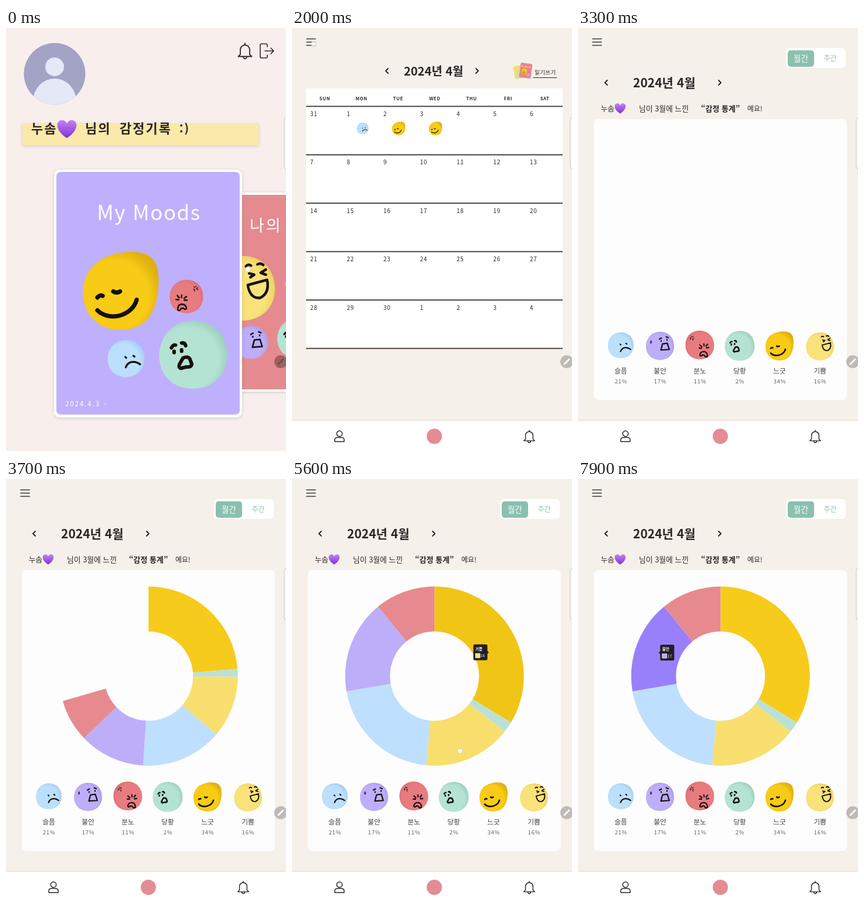
An HTML page for the animation above (8 s loop, 478 px wide and 720 px high).

```html
<!DOCTYPE html>
<html lang="ko">
<head>
<meta charset="utf-8">
<title>My Moods</title>
<style>
  html, body { margin: 0; width: 100%; height: 100%; overflow: hidden; background: #f7f0eb; }
  svg { display: block; width: 100vw; height: 100vh; }
  text { font-family: "Noto Sans CJK KR", "Noto Sans CJK", "Noto Sans CJK JP", "Noto Sans", sans-serif; }
</style>
</head>
<body>
<svg id="stage" viewBox="0 0 478 720"></svg>
<script>
const LOOP = 8000, STEP = 100;
const TITLE = 'My Moods', USER = '누솜';
const INK = '#2b2626';

// ---------- drawing helpers ----------
const text = (x, y, size, str, o = {}) =>
  `<text x="${x}" y="${y}" font-size="${size}" font-weight="${o.w || 400}" fill="${o.fill || INK}"
    text-anchor="${o.mid ? 'middle' : 'start'}" letter-spacing="${o.ls || 0}">${str}</text>`;
const rect = (x, y, w, h, r, fill, more = '') =>
  `<rect x="${x}" y="${y}" width="${w}" height="${h}" rx="${r}" fill="${fill}" ${more}/>`;
const line = (d, width = 1.8, color = INK) =>
  `<path d="${d}" fill="none" stroke="${color}" stroke-width="${width}" stroke-linecap="round" stroke-linejoin="round"/>`;
const at = (x, y, s, body) => `<g transform="translate(${x} ${y}) scale(${s})">${body}</g>`;
const group = (id, body) => `<g id="${id}">${body}</g>`;

// ---------- mood faces, drawn in a box of -50..50 ----------
const ROUND = 'M2,-50 C32,-49 51,-27 50,2 C50,30 28,50 0,50 C-30,50 -50,30 -50,1 C-49,-28 -30,-50 2,-50Z';
const CORNER = 'M8,-51 C38,-53 50,-42 50,-14 C50,26 34,52 -1,52 C-36,51 -50,26 -50,2 C-50,-28 -28,-48 8,-51Z';
const MOODS = {
  calm: { base: '#f7cb16', edge: '#dfb00f', shape: CORNER, pen: 5.6,
    lines: 'M-31,9 Q-27,5 -24,7 M-10,1 Q-5,4 -1,1 M-31,26 C-16,41 15,34 21,12' },
  sad: { base: '#bcdffc', edge: '#a3cdf0', shape: ROUND, pen: 5.2,
    lines: 'M-2,-4 l2,2 M20,-7 l3,2 M-1,24 C6,6 26,6 38,16' },
  shock: { base: '#b5e3d3', edge: '#98cdba', shape: ROUND, pen: 5.2,
    lines: 'M-32,-10 q3,-5 6,-4 M-17,-17 q5,-1 6,4 M-28,-5 v2 M-17,-7 v2 M-15,5 Q-8,2 -5,6 L-2,14 Q-3,19 -10,18 L-18,20 Q-22,19 -20,14Z' },
  angry: { base: '#e87b80', edge: '#dd7177', shape: ROUND, pen: 4.4,
    lines: 'M-27,-3 l5,7 M-31,9 l8,1 M-14,-4 l-1,7 M0,0 l-7,6 M2,11 l-8,0 M-26,40 Q-27,25 -15,23 Q-1,23 0,36 Q-4,41 -9,35 Q-16,33 -18,40 Q-22,43 -26,40Z',
    thin: 'M22,-29 l4,2 l3,-4 M34,-26 l-4,3 l4,3 M21,-22 l4,1 l-1,5' },
  worry: { base: '#bdaefa', edge: '#ad9def', shape: ROUND, pen: 4.6,
    lines: 'M-2,-24 l7,-4 M22,-32 l7,3 M4,-18 v2 M25,-22 v2 M3,15 L9,-7 L26,-9 L33,13Z',
    thin: 'M-32,-18 q-4,8 0,9 q4,-1 0,-9' },
  joy: { base: '#f9e27a', edge: '#ead05c', shape: ROUND, pen: 4,
    lines: 'M5,-34 q4,-4 8,-1 M23,-37 q5,-3 9,1 M10,-23 l8,2 l-6,4 M36,-29 l-8,5 l8,3 M8,-5 L38,-13 Q42,8 27,15 Q11,16 8,-5Z' }
};
const face = (name, x, y, s, flip = 1) => {
  const m = MOODS[name];
  return `<g transform="translate(${x} ${y}) scale(${s * flip} ${s})">
    <path d="${m.shape}" fill="url(#${name})"/>${line(m.lines, m.pen, '#15100c')}
    ${m.thin ? line(m.thin, 2.6, '#4a1f22') : ''}</g>`;
};

const heart = (x, y, s) =>
  at(x, y, s, '<path d="M0,15 C-22,1 -18,-15 -8,-15 C-4,-15 -1,-12 0,-9 C1,-12 4,-15 8,-15 C18,-15 22,1 0,15Z" fill="url(#heart)"/>');
const bell = (x, y, s) =>
  at(x, y, s, line('M-8,6 V-2 a8,8 0 0 1 16,0 V6 l3.5,3.5 H-11.5Z M0,-10.5 v-2.5 M-3,10 a3,3.4 0 0 0 6,0', 1.8));
const burger = line('M25,18.5 H40 M25,24 H40 M25,29.5 H40', 1.7, '#3c3838');
const arrows = (a, b, y) =>
  line(`M${a + 2},${y - 4} l-4,4 l4,4 M${b - 2},${y - 4} l4,4 l-4,4`, 2);
const pen = (fill, ink) =>
  at(469, 568, 1, `<circle r="11" fill="${fill}"/>` + line('M-4,4 L4,-4', 2.6, ink));

const nav = rect(0, 669, 478, 60, 0, '#fff', 'filter="url(#soft)"') +
  line('M76.3,690.5 a4.7,4.7 0 1 1 9.4,0 a4.7,4.7 0 1 1 -9.4,0 M73,704 V701 q0,-4 5,-4 h6 q5,0 5,4 V704Z', 1.5) +
  '<circle cx="243" cy="695" r="13" fill="#e48c95"/>' + bell(405, 695, .8);

// ---------- pages ----------
function home() {
  return rect(0, 0, 478, 720, 0, '#f8efec') +
    `<clipPath id="disc"><circle cx="83" cy="78" r="52.5"/></clipPath>
    <g clip-path="url(#disc)">${rect(30, 25, 106, 106, 0, '#a2a3c5')}
      <circle cx="83" cy="66" r="16" fill="#e4e8f7"/><ellipse cx="83" cy="125" rx="37" ry="39" fill="#e4e8f7"/></g>` +
    bell(408, 39, 1) +
    line('M446,32 V29 q0,-2 -2,-2 H436 q-2,0 -2,2 V49 q0,2 2,2 H444 q2,0 2,-2 V46 M442,39 H457 M452,34 l5,5 l-5,5', 1.6) +
    rect(28, 163, 403, 37, 0, '#fae9ab', 'filter="url(#soft)"') +
    text(43, 179, 22, USER, { w: 900, ls: 2 }) + heart(104, 172, 1.02) +
    text(135, 179, 22, '님의', { w: 900, ls: 2 }) + text(194, 179, 22, '감정기록', { w: 900, ls: 2 }) +
    text(296, 179, 20, ':)', { w: 900, ls: 2 }) +
    rect(340, 280, 200, 339, 9, '#fff', 'filter="url(#soft)"') + rect(344, 284, 192, 331, 6, '#e58b90') +
    text(416, 346, 27, '나의', { fill: '#fff', w: 500, ls: 3 }) +
    face('joy', 404, 443, 1.1) + face('worry', 419, 535, .56) +
    face('sad', 492, 435, .3) + face('shock', 497, 528, .68) +
    rect(82, 241, 321, 422, 10, '#fff', 'filter="url(#soft)"') + rect(86, 245, 313, 413, 7, '#bfb0fd') +
    text(244, 327, 35, TITLE, { fill: '#fff', mid: 1, ls: 1.5 }) +
    face('calm', 196, 447, 1.29) + face('angry', 308, 457, .57) +
    face('sad', 205, 562.5, .63) + face('shock', 319.5, 556, 1.16) +
    text(101, 644, 11.5, '2024.4.3 ~', { fill: '#fff', ls: 1.9 }) +
    pen('rgba(70,45,45,.45)', '#6d4a4c');
}

const marks = face('sad', 120.5, 171, .2) + face('calm', 182, 171, .225) + face('calm', 245, 171, .225);
const booklet =
  `<g transform="rotate(-8 387 74)">${rect(379, 64, 17, 22, 2, '#f6dd63')}
    <circle cx="384" cy="72" r="2.5" fill="#bcdffc"/><circle cx="384" cy="81" r="3" fill="#b5e3d3"/></g>
  <g transform="rotate(8 399 72)">${rect(389, 60, 20, 25, 2, '#e8848c')}
    ${text(399, 67, 3.6, TITLE, { fill: '#fff', mid: 1 })}${face('calm', 397, 74, .1)}
    <circle cx="404.5" cy="79" r="2.2" fill="#bdaefa"/></g>`;

function calendar() {
  const heads = ['SUN', 'MON', 'TUE', 'WED', 'THU', 'FRI', 'SAT'];
  let s = rect(0, 0, 478, 720, 0, '#f6f0ea') +
    text(191, 81, 20, '2024년 4월', { w: 700 }) + arrows(162, 316, 73) + booklet +
    text(414, 79, 9.6, '일기쓰기', { ls: .3 }) + line('M412,84.5 H452', 1) +
    rect(24, 103, 438, 442, 0, '#fff');
  heads.forEach((h, i) => s += text(56 + 62.6 * i, 122.5, 7.8, h, { w: 700, mid: 1, ls: .6 }));
  for (let r = 0; r < 6; r++) s += rect(24, 132.5 + 82.4 * r, 438, 1.8, 0, '#3a3636');
  for (let i = 0; i < 35; i++) {
    const day = i === 0 ? 31 : i > 30 ? i - 30 : i;
    s += text(31 + 62.5 * (i % 7), 150 + 82.4 * Math.floor(i / 7), 10, day, { ls: .8 });
  }
  return s + marks + nav + burger;
}

function menu() {
  const rows = ['오늘의 일기', '캘린더', '감정 통계', '설정'];
  const icons = [
    'M0,-4 q-3,-2 -6.5,-1 V5 q4,-1 6.5,1 q2.5,-2 6.5,-1 V-5 q-3.5,-1 -6.5,1 V6',
    'M-6,-4 H6 V6 H-6Z M-6,0 H6 M-3,-6 V-3 M3,-6 V-3 M-2,3 H2',
    'M-6,-6 V6 H7 M-4,3 l3,-4 l3,2 l4,-6',
    'M-2.2,0 a2.2,2.2 0 1 1 4.4,0 a2.2,2.2 0 1 1 -4.4,0 M-1.5,-7 h3 l1,2 l2.5,-.5 l1.5,2.5 l-1,2 l0,2 l1,2 l-1.5,2.5 l-2.5,-.5 l-1,2 h-3 l-1,-2 l-2.5,.5 l-1.5,-2.5 l1,-2 l0,-2 l-1,-2 l1.5,-2.5 l2.5,.5Z'
  ];
  let s = rect(0, 538, 478, 190, 0, '#fefefe') + text(243.5, 562, 14, TITLE, { w: 700, mid: 1 }) +
    rect(0, 573, 478, 1, 0, '#ececec') + line('M465.5,549.5 l8,8 M473.5,549.5 l-8,8', 1.3, '#555');
  rows.forEach((r, i) => {
    const y = 593.5 + 34.2 * i;
    s += at(31, y, 1, line(icons[i], 1.2)) + text(49, y + 4.5, 11.5, r, { ls: .3 });
  });
  return s;
}

// ---------- ring chart ----------
const PARTS = [
  { name: '느긋', n: 34, c: [247, 203, 28], hot: [239, 196, 21] },
  { name: '당황', n: 2, c: [187, 225, 214], hot: [150, 210, 190] },
  { name: '기쁨', n: 16, c: [248, 223, 112], hot: [247, 214, 72] },
  { name: '슬픔', n: 21, c: [191, 223, 254], hot: [152, 201, 253] },
  { name: '불안', n: 17, c: [189, 174, 250], hot: [152, 128, 250] },
  { name: '분노', n: 11, c: [230, 138, 143], hot: [222, 110, 118] }
];
const CX = 243.3, CY = 335.5, R1 = 152.5, R0 = 76;
const TOTAL = PARTS.reduce((a, p) => a + p.n, 0);
let sum = 0;
for (const p of PARTS) {
  p.from = sum / TOTAL; sum += p.n; p.to = sum / TOTAL;
  const [x, y] = polar((p.from + p.to) / 2, (R0 + R1) / 2);
  p.right = x > CX;
  p.tipX = p.right ? x - 28 : x + 4;
  p.tipY = y - 13.5;
}
function polar(turn, r) {
  const a = turn * 2 * Math.PI;
  return [CX + r * Math.sin(a), CY - r * Math.cos(a)];
}
function sector(a, b) {
  const big = b - a > .5 ? 1 : 0;
  return `M${polar(a, R1)} A${R1},${R1} 0 ${big} 1 ${polar(b, R1)} L${polar(b, R0)} A${R0},${R0} 0 ${big} 0 ${polar(a, R0)}Z`;
}

function stats() {
  const legend = [
    ['sad', '슬픔', 21, 73, 540, .44, 1], ['worry', '불안', 17, 140, 541, .48, 1], ['angry', '분노', 11, 208, 539.5, .49, -1],
    ['shock', '당황', 2, 276, 541, .51, 1], ['calm', '느긋', 34, 344, 541, .48, 1], ['joy', '기쁨', 16, 413, 542, .475, 1]
  ];
  let s = rect(0, 0, 478, 720, 0, '#f6f0ea') + burger +
    rect(355, 34, 102, 34, 7, '#fff') + rect(358, 38, 45, 28, 5, '#8ac0ae') +
    text(380.5, 56.5, 13.5, '월간', { fill: '#fff', mid: 1 }) + text(430.5, 56, 12, '주간', { fill: '#8ac0ae', mid: 1 }) +
    arrows(48, 242, 93) + text(94, 101, 21, '2024년 4월', { w: 700 }) +
    text(39, 142, 12.5, USER) + heart(72, 137, .58) +
    text(104, 142, 12.8, '님이 3월에 느낀') + text(210, 142, 13, '“감정 통계”', { w: 700 }) + text(289, 142, 12, '예요!') +
    rect(27, 155, 432, 478, 8, '#fefdfd');
  PARTS.forEach((p, i) => s += `<path id="part${i}"/>`);
  for (const [mood, name, n, x, y, k, flip] of legend)
    s += face(mood, x, y, k, flip) + text(x, 588, 11.8, name, { mid: 1, fill: '#444' }) +
      text(x + .5, 605, 9.5, n + '%', { mid: 1, fill: '#666', ls: .8 });
  return s + nav + group('tip',
    '<path id="caret" fill="#211f22"/>' + rect(0, 0, 24, 27, 2.5, '#211f22') +
    '<text id="tipName" x="3.5" y="10.5" font-size="6.5" font-weight="700" fill="#fff"></text>' +
    '<rect id="tipBox" x="3.5" y="15.5" width="8" height="7.5" stroke="#fff" stroke-width=".6"/>' +
    '<text id="tipNum" x="12.5" y="21.8" font-size="6.5" fill="#fff"></text>');
}

// ---------- stage ----------
const $ = id => document.getElementById(id);
const shades = Object.entries(MOODS).map(([id, m]) =>
  `<radialGradient id="${id}" cx=".42" cy=".56" r=".62"><stop offset=".72" stop-color="${m.base}"/>
   <stop offset="1" stop-color="${m.edge}"/></radialGradient>`).join('');
$('stage').innerHTML = `<defs>${shades}
  <linearGradient id="heart" x2="0" y2="1"><stop stop-color="#c583f4"/><stop offset="1" stop-color="#7f2fd6"/></linearGradient>
  <filter id="soft" x="-10%" y="-20%" width="120%" height="150%">
    <feDropShadow dx="0" dy="1" stdDeviation="2.5" flood-opacity=".18"/></filter></defs>` +
  group('home', home()) + group('calendar', calendar()) + group('stats', stats()) +
  rect(475, 153, 10, 86, 3, '#fbfafa', 'stroke="#c9c5c3" stroke-width="1"') +
  group('dim', rect(0, 0, 478, 720, 0, '#000', 'opacity=".5"') + rect(17, 10, 31, 37, 4, '#6a6a6b') + burger +
    `<g id="glow" opacity=".2">${marks}</g><g opacity=".25">${booklet}</g>`) +
  group('menu', menu()) + group('pen', pen('#bdbab8', '#fff')) +
  '<circle id="touch" r="4.5" fill="#fff" fill-opacity=".8" stroke="#cfc7b8" stroke-width="1"/>';

// ---------- timeline ----------
const TO_CALENDAR = 1400, TO_STATS = 3300, GROW = 3437;
const HOVERS = [[4900, 0], [5590, 2], [6200, 3], [7250, 4]];
const TOUCHES = [
  [0, 413, 411], [1950, 37, 27], [3000, 72, 661],
  [4900, 345, 268], [5590, 287, 463], [6200, 178, 440], [7250, 118, 300]
];
const span = (t, a, len) => Math.min(1, Math.max(0, (t - a) / len));
const outQuart = p => 1 - (1 - p) ** 4;
const inOut = p => p * p * (3 - 2 * p);
const mix = (a, b, p) => a + (b - a) * p;
const show = (id, on) => $(id).style.display = on ? '' : 'none';

function drawChart(t) {
  const grow = outQuart(span(t, GROW, 1000));
  const k = HOVERS.filter(h => h[0] <= t).length - 1;
  const now = k < 0 ? -1 : HOVERS[k][1], was = k < 1 ? -1 : HOVERS[k - 1][1];
  const p = k < 0 ? 0 : outQuart(span(t, HOVERS[k][0], 400));
  PARTS.forEach((part, i) => {
    const heat = i === now ? p : i === was ? 1 - p : 0;
    $('part' + i).setAttribute('d', grow ? sector(part.from * grow, part.to * grow) : '');
    $('part' + i).setAttribute('fill', `rgb(${part.c.map((v, j) => Math.round(mix(v, part.hot[j], heat)))})`);
  });
  show('tip', k >= 0);
  if (k < 0) return;
  const to = PARTS[now], from = was < 0 ? to : PARTS[was];
  $('tip').setAttribute('transform', `translate(${mix(from.tipX, to.tipX, p)} ${mix(from.tipY, to.tipY, p)})`);
  $('tip').setAttribute('opacity', was < 0 ? p : 1);
  $('caret').setAttribute('d', to.right ? 'M23.5,10.5 l3,3 l-3,3Z' : 'M.5,10.5 l-3,3 l3,3Z');
  $('tipName').textContent = to.name;
  $('tipNum').textContent = to.n;
  $('tipBox').setAttribute('fill', `rgb(${to.c})`);
}

function draw(time) {
  const t = Math.floor(time % LOOP / STEP) * STEP;
  show('home', t < TO_CALENDAR);
  show('calendar', t >= TO_CALENDAR && t < TO_STATS);
  show('stats', t >= TO_STATS);
  show('pen', t >= TO_CALENDAR);
  const open = inOut(span(t, 2100, 300)) - inOut(span(t, 3000, 300));
  show('dim', open > 0);
  show('menu', open > 0);
  $('dim').setAttribute('opacity', open);
  $('menu').setAttribute('transform', `translate(0 ${182 * (1 - open)})`);
  show('glow', t < 2800);
  if (t >= TO_STATS) drawChart(t);
  const hit = TOUCHES.find(h => t >= h[0] && t < h[0] + 150);
  show('touch', hit);
  if (hit) $('touch').setAttribute('transform', `translate(${hit[1]} ${hit[2]})`);
}

const start = performance.now();
function tick() {
  draw(performance.now() - start);
  requestAnimationFrame(tick);
}
tick();
</script>
</body>
</html>
```
